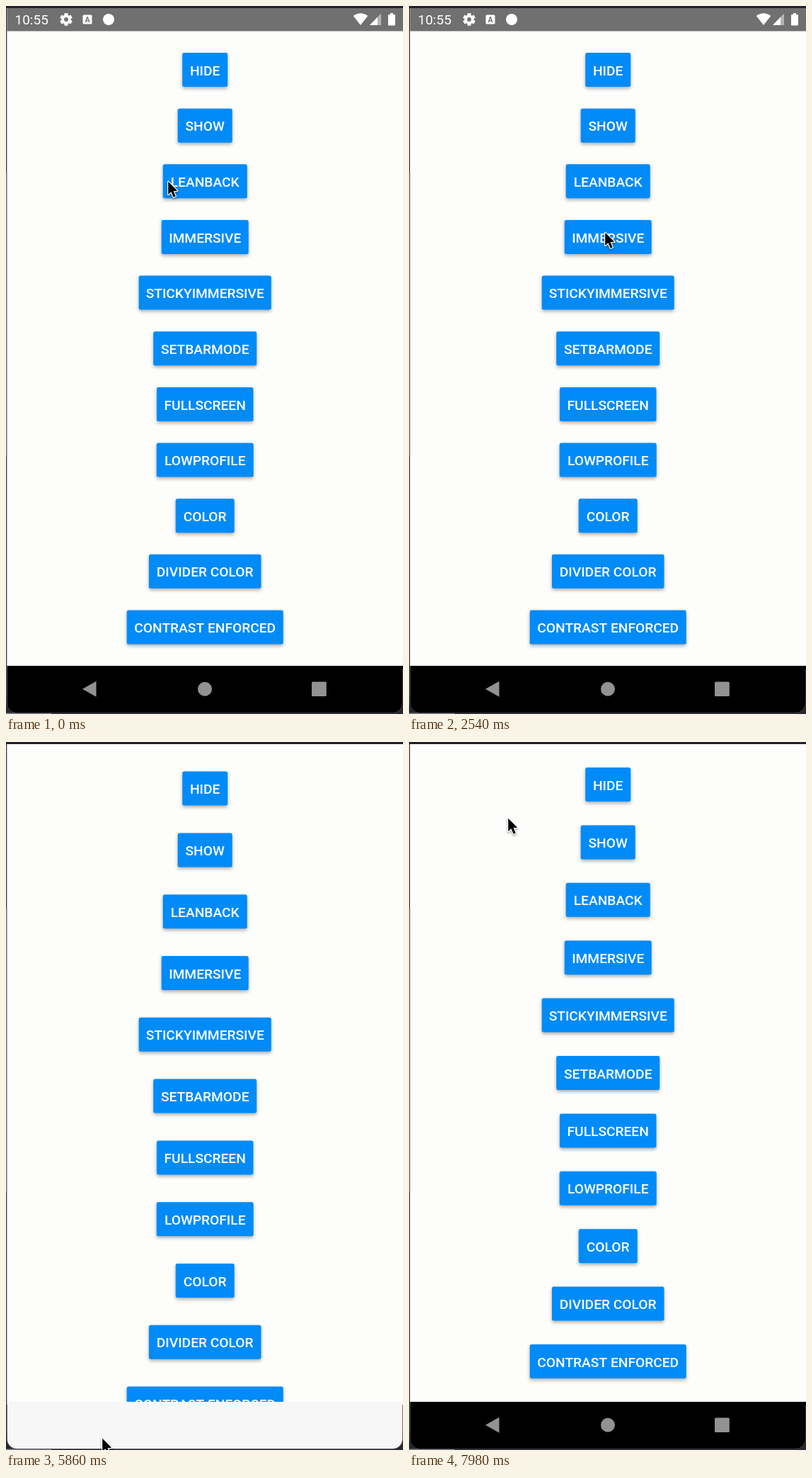
An HTML page with a canvas for the animation above (8000 ms loop, 561 by 999 pixels).

```html
<!DOCTYPE html>
<html lang="en">
<head>
<meta charset="utf-8">
<title>System bars demo</title>
<style>
html, body { margin: 0; width: 100%; height: 100%; overflow: hidden; background: #fdfdfc; }
canvas { display: block; }
</style>
</head>
<body>
<canvas id="stage"></canvas>
<script>
const W = 561, H = 999, LOOP = 8000, CX = 281.2;
const canvas = document.getElementById('stage');
const ctx = canvas.getContext('2d');
const ratio = window.devicePixelRatio || 1;
canvas.width = W * ratio;
canvas.height = H * ratio;
canvas.style.width = W + 'px';
canvas.style.height = H + 'px';

const BUTTONS = [
  ['HIDE', 64], ['SHOW', 77], ['LEANBACK', 119], ['IMMERSIVE', 123],
  ['STICKYIMMERSIVE', 187], ['SETBARMODE', 146], ['FULLSCREEN', 136.5],
  ['LOWPROFILE', 137], ['COLOR', 83], ['DIVIDER COLOR', 158.5],
  ['CONTRAST ENFORCED', 221]
];
const BUTTON_H = 48;

// Button column: top of the first button and step between buttons
const BOTH_BARS = { top: 66, step: 78.65 };
const SHIFTED = { top: 33.4, step: 78.65 };
const FULL = { top: 41.6, step: 86.8 };
const NAV_ONLY = { top: 36, step: 81.4 };

// time, left, top
const CURSOR = [
  [0, 228, 246], [280, 229, 246], [600, 300, 800], [840, 342, 855],
  [1560, 276, 498], [1700, 270, 245], [1960, 270, 245], [2280, 296, 420],
  [2540, 276, 318], [2760, 276, 318], [3380, 173, 657], [3860, 150, 966],
  [4360, 155, 926], [4900, 138, 970], [5860, 135, 981], [6320, 117, 836],
  [6800, 113, 890], [7540, 115, 861], [7980, 139, 106], [8000, 139, 106]
];

// start, button index, x of the touch
const PRESSES = [[50, 2, 231], [1720, 2, 272], [2560, 3, 279]];

const clamp = v => Math.max(0, Math.min(1, v));
const progress = (t, start, length) => clamp((t - start) / length);

function hideBars(t, start) {
  if (t >= start + 120) return { col: FULL, status: 0, nav: 0 };
  return { col: SHIFTED, status: 0, nav: 0.03, rise: 1, strip: 897.5 };
}

function showBars(t, start) {
  const p = 1 - (1 - progress(t, start, 200)) ** 2.5;
  return { col: BOTH_BARS, status: p, nav: p, rise: 50 * (1 - p) };
}

function barsAt(t) {
  if (t < 160) return { col: BOTH_BARS, status: 1, nav: 1 };
  if (t < 600) return hideBars(t, 160);
  if (t < 1800) return showBars(t, 600);
  if (t < 2260) return hideBars(t, 1800);
  if (t < 2680) return showBars(t, 2260);
  if (t < 5850) return hideBars(t, 2680);
  if (t < 5950) return { col: FULL, status: 0, nav: 0, strip: 931 };
  const p = 1 - (1 - progress(t, 5900, 700)) ** 2.5;
  return { col: NAV_ONLY, status: 0, nav: p, rise: 50 * (1 - p) };
}

function cursorAt(t) {
  const i = Math.max(1, CURSOR.findIndex(k => k[0] > t));
  const [t0, x0, y0] = CURSOR[i - 1], [t1, x1, y1] = CURSOR[i];
  let p = (t - t0) / (t1 - t0);
  p = p * p * (3 - 2 * p);
  return [x0 + (x1 - x0) * p, y0 + (y1 - y0) * p];
}

function rect(x, y, w, h, color) {
  ctx.fillStyle = color;
  ctx.fillRect(x, y, w, h);
}

function disc(x, y, r, color) {
  ctx.fillStyle = color;
  ctx.beginPath();
  ctx.arc(x, y, r, 0, 7);
  ctx.fill();
}

function round(x, y, w, h, r, color) {
  ctx.fillStyle = color;
  ctx.beginPath();
  ctx.roundRect(x, y, w, h, r);
  ctx.fill();
}

function poly(points, color) {
  ctx.fillStyle = color;
  ctx.beginPath();
  points.forEach(([x, y]) => ctx.lineTo(x, y));
  ctx.closePath();
  ctx.fill();
}

function label(text, x, y, font, align = 'center') {
  ctx.font = font + ' Roboto, sans-serif';
  ctx.textAlign = align;
  ctx.fillStyle = '#fff';
  ctx.fillText(text, x, y);
}

function shadow(color, blur, dy) {
  ctx.shadowColor = color;
  ctx.shadowBlur = blur * ratio;
  ctx.shadowOffsetY = dy * ratio;
}

function drawRipple(t, index, x, y, w) {
  for (const [start, target, touch] of PRESSES) {
    const age = t - start;
    if (target !== index || age < 0 || age > 420) continue;
    ctx.save();
    ctx.beginPath();
    ctx.roundRect(x, y, w, BUTTON_H, 2.5);
    ctx.clip();
    ctx.globalAlpha = clamp((420 - age) / 180);
    disc(touch, y + 22, 14 + age * 0.3, '#007ad8');
    ctx.restore();
  }
}

function drawButtons(t, col) {
  BUTTONS.forEach(([text, w], i) => {
    const x = CX - w / 2, y = col.top + i * col.step;
    ctx.save();
    shadow('rgba(0,0,0,.32)', 5, 2.5);
    round(x, y, w, BUTTON_H, 2.5, '#008bf8');
    ctx.restore();
    drawRipple(t, i, x, y, w);
    label(text, CX, y + 31.6, '500 19.2px');
  });
}

function drawGear(x, y) {
  ctx.save();
  ctx.translate(x, y);
  for (let i = 0; i < 6; i++) {
    rect(-2.5, -8.8, 5, 5, '#fff');
    ctx.rotate(Math.PI / 3);
  }
  disc(0, 0, 6.7, '#fff');
  disc(0, 0, 2.9, '#707070');
  ctx.restore();
}

function drawStatus(alpha) {
  if (!alpha) return;
  ctx.save();
  ctx.globalAlpha = alpha;
  rect(1.5, 3, W, 32.5, '#707070');
  label('10:55', 12.5, 26, '400 19px', 'left');
  drawGear(85, 19);
  round(108.5, 12.5, 13, 13, 1.5, '#fff');
  ctx.font = '700 10.5px Roboto, sans-serif';
  ctx.textAlign = 'center';
  ctx.fillStyle = '#707070';
  ctx.fillText('A', 115, 22.8);
  disc(145, 19, 8, '#fff');
  ctx.beginPath();
  ctx.moveTo(501, 27);
  ctx.lineTo(490.8, 14);
  ctx.quadraticCurveTo(501, 6.5, 511.2, 14);
  ctx.fillStyle = '#fff';
  ctx.fill();
  poly([[514, 27], [530, 27], [530, 10.5]], '#b4b4b4');
  poly([[514, 27], [525, 27], [525, 15.7]], '#fff');
  round(540, 12, 10, 15.5, 1.2, '#fff');
  rect(543, 10, 4, 2.5, '#fff');
  ctx.restore();
}

function drawNav({ nav, rise = 0, strip }) {
  if (strip) rect(1.5, strip, W, 998 - strip, '#f7f7f7');
  if (!nav) return;
  const y = 963.8 + rise, faint = nav < 0.1;
  ctx.save();
  if (faint) {
    ctx.globalAlpha = 0.6;
    shadow('rgba(0,0,0,.18)', 2, 1);
  } else {
    rect(1.5, 931, W, 67, `rgba(0,0,0,${nav})`);
  }
  const color = faint ? '#fcfcfc' : nav < 1 ? '#999' : '#929292';
  poly([[108, y], [127.5, y - 11], [127.5, y + 11]], color);
  disc(281, y, 10, color);
  round(432, y - 10.3, 20.8, 20.6, 1.5, color);
  ctx.restore();
}

function drawBezel() {
  rect(0, 0, W, 3, '#241f2b');
  rect(0, 3, 1.3, H, '#39363d');
  rect(0, 235, 1.3, 400, '#77757a');
  // Everything outside the screen's rounded lower corners
  ctx.beginPath();
  ctx.rect(0, 900, W, 99);
  ctx.roundRect(1.3, 880, W - 1.8, 117.6, 14);
  ctx.save();
  ctx.clip('evenodd');
  rect(0, 975, W, 24, '#29272d');
  rect(0, 997.6, 64, 2, '#858387');
  ctx.restore();
  ctx.strokeStyle = '#4c4a4e';
  ctx.lineWidth = 0.8;
  ctx.beginPath();
  ctx.moveTo(1.3, 935);
  ctx.arcTo(1.3, 997.6, 16, 997.6, 14);
  ctx.arcTo(560.5, 997.6, 560.5, 980, 14);
  ctx.lineTo(560.5, 935);
  ctx.stroke();
}

function drawCursor([x, y]) {
  ctx.save();
  ctx.translate(x + 1.2, y + 1.8);
  ctx.beginPath();
  [[0, 0], [0, 18.3], [4.2, 14.5], [7.5, 22], [10.6, 20.7], [7.3, 13.4], [13, 13]]
    .forEach(([px, py]) => ctx.lineTo(px, py));
  ctx.closePath();
  shadow('rgba(0,0,0,.4)', 3, 1.5);
  ctx.lineWidth = 2.4;
  ctx.lineJoin = 'round';
  ctx.strokeStyle = '#fff';
  ctx.stroke();
  shadow('transparent', 0, 0);
  ctx.fillStyle = '#000';
  ctx.fill();
  ctx.restore();
}

function draw(now) {
  const t = now % LOOP, bars = barsAt(t);
  ctx.setTransform(ratio, 0, 0, ratio, 0, 0);
  rect(0, 0, W, H, '#fdfdfc');
  drawButtons(t, bars.col);
  drawStatus(bars.status);
  drawNav(bars);
  drawBezel();
  drawCursor(cursorAt(t));
}

const begin = performance.now();
function loop() {
  draw(performance.now() - begin);
  requestAnimationFrame(loop);
}
loop();
</script>
</body>
</html>
```
